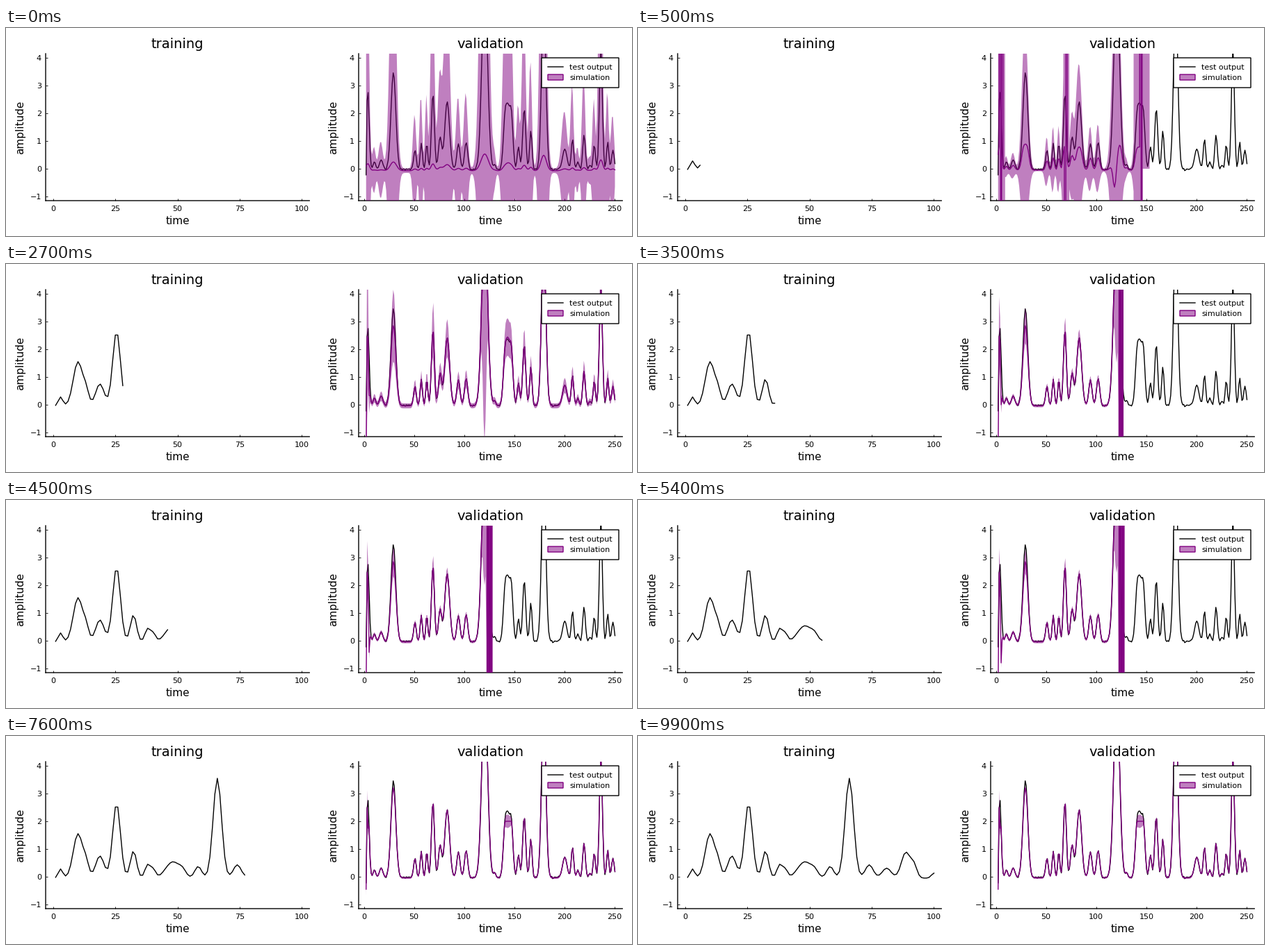
Recreate the animation shown at these times as a matplotlib script. Size 900 by 300 pixels, loop 10000 ms.

```python
import numpy as np
import matplotlib.pyplot as plt
from matplotlib.animation import FuncAnimation
from matplotlib.patches import Rectangle

W, H, DPI = 900, 300, 100
FRAMES, INTERVAL = 100, 100
TOP, BOTTOM, WIDTH = 37, 249, 379.2
PURPLE = "#800080"
HUGE = 60

plt.rcParams["font.family"] = "DejaVu Sans"
plt.rcParams["path.snap"] = False

# pulses: centre, height, spread
TRAIN = [
    (3, .33, .9), (10, 1.6, 1.9), (13.3, .45, 1.1), (18.8, .8, 1.7),
    (25.5, 2.7, 1.55), (32.3, .98, 1.25), (38, .48, 1.1), (40.3, .3, 1),
    (45, .15, 1.8), (48.3, .55, 2.2), (52, .28, 1.5), (58.3, .42, 1.4),
    (66, 3.6, 1.7), (74, .48, 1.6), (81, .36, 1.8), (88.7, .93, 1.8),
    (92, .42, 1.2), (100, .18, 1)]
TEST = [
    (3.7, 2.85, 1.35), (10.3, .28, 1.3), (17, .35, 1.7), (29.2, 3.5, 2.4),
    (50.7, .7, 1.3), (57, .95, 1.1), (62.5, .95, 1), (68.6, 2.75, 1.45),
    (75.7, 1.15, 1.6), (82.8, 2.45, 2.4), (94, .93, 1.6), (101.7, .98, 1.6),
    (120.2, 6.7, 2.85), (130.2, .17, 1.1), (140.9, 2.15, 1.9),
    (143.6, 1.05, 1.3), (146.5, 2.15, 1.75), (153.8, .82, 1.2),
    (159.6, 2.2, 1.5), (166.2, 1.4, 1.2), (179, 6.2, 2.1), (200, .74, 2.2),
    (207.7, 1.1, 1.2), (213, .28, 1.1), (219.2, 1.25, 1.3), (225, .15, 1.2),
    (229.4, .9, 1.1), (236, 4.4, 1.45), (242.8, 1, 1.1), (248, .7, 1.3)]


def pulses(t, parts, spread=1, shift=0):
    return sum(a * np.exp(-((t - c - shift) / (s * spread)) ** 2 / 2)
               for c, a, s in parts)


def bump(c, a, s):
    return pulses(x, [(c, a, s)])


def within(a, b):
    return (x >= a) & (x <= b)


def flip(t):
    return HUGE * np.where(t % 2 == 0, 1, -1)


train_x = np.arange(1, 101)
train_y = pulses(train_x, TRAIN) - .05
x = np.arange(2.0, 251)
rng = np.random.default_rng(3)
level = pulses(x, TEST)
output = level - .03 + rng.uniform(-.04, .04, x.size) * (level < .15)
output[0] = -.22

prior_mean = .09 * pulses(x, TEST, 1.3) - .07
prior_half = .08 + 2.7 * pulses(x, TEST, 1.2, -.5)
fit = pulses(x, TEST, 1.03) - .04 + bump(29, -.25, 2.5)


def unlearned(k):
    return prior_mean, prior_half * (1 - .1 * k), x.size


def unstable():
    """A weak fit that diverges in three places and stops at the last."""
    mean = np.tanh(.5 * level) - .05 + bump(118, -1.6, 2)
    half = .45 * prior_half
    for a, b in ((3, 8), (68, 72), (138, 153)):
        half[within(a, b)] = HUGE
    for a, b in ((4, 6), (69, 70), (144, 146)):
        hit = within(a, b)
        mean[hit] = flip(x[hit])
    mean[x > 146] = HUGE
    return mean, half, 152


def explode(mean, half, a, b):
    """Alternating divergence from a to b, nothing after it."""
    hit = within(a, b)
    mean[hit] = flip(x[hit])
    half[hit] = HUGE
    return mean, half, int(b - 1)


def partial(k):
    """Good up to the highest pulse; p runs as the start gets rougher."""
    p = np.clip((k - 35) / 19, -.5, 1.2)
    mean = np.minimum(fit, 4.2) + bump(29, -.35, 2.5)
    mean += bump(5, -1.8 - .8 * p, .6)
    mean[0] = -1.8
    half = (.05 + (.11 - .06 * p) * np.minimum(level, 4)
            + bump(29, .2, 2.5) + bump(120, 2.2 - .7 * p, 1.6)
            + bump(3, 1.1 - .4 * p, .8) + bump(70, .3, 1))
    if k < 28:
        return mean, half * 1.8, x.size
    return explode(mean, half, 122, 127 if k < 45 else 128)


def learned(k):
    mean = np.where(within(138, 149), np.minimum(fit, 2), fit)
    mean[:3] = -.45, 2.5, 1.75
    half = .035 + .015 * level + bump(143, .17, 3) + bump(3, .55, .7)
    return mean, half * (1.6 if k < 66 else 1), x.size


def simulate(k):
    """Mean, half width and number of valid samples."""
    if k < 5:
        return unlearned(k)
    if k < 7:
        return unstable()
    if k < 24:
        return explode(output.copy(), np.full(x.size, .2), 2, 6)
    return partial(k) if k < 64 else learned(k)


fig = plt.figure(figsize=(W / DPI, H / DPI), dpi=DPI, facecolor="white")
over = fig.add_axes([0, 0, 1, 1], zorder=5)
over.set(xlim=(0, W), ylim=(H, 0))
over.axis("off")


def text(px, py, label, size, **kw):
    over.text(px, py, label, **{"fontsize": size, "va": "baseline", **kw})


def box(x0, y0, x1, y1, **kw):
    over.add_patch(Rectangle((x0, y0), x1 - x0, y1 - y0, lw=1, **kw))


def panel(left, xlim, ticks, title):
    ax = fig.add_axes([left / W, 1 - BOTTOM / H, WIDTH / W, (BOTTOM - TOP) / H])
    ax.set(xlim=xlim, ylim=(-1.15, 4.15), xticks=ticks, yticks=range(-1, 5))
    ax.patch.set_visible(False)
    ax.spines[["top", "right"]].set_visible(False)
    ax.spines[["left", "bottom"]].set_linewidth(1)
    ax.tick_params(direction="in", length=2, width=.6,
                   labelbottom=False, labelleft=False)
    mid = left + WIDTH / 2
    scale = WIDTH / (xlim[1] - xlim[0])
    text(mid, 29, title, 14, ha="center")
    text(mid, 283, "time", 11, ha="center")
    text(left - 36, 143.5, "amplitude", 11, ha="center", va="center", rotation=90)
    for t in ticks:
        text(left + (t - xlim[0]) * scale - .3, 263.6, str(t), 8, ha="center")
    for t in range(-1, 5):
        text(left - 6, 207 - 40 * t, str(t).replace("-", "\u2212"), 8, ha="right")
    return ax


left = panel(57, (-3, 103), range(0, 101, 25), "training")
right = panel(507, (-5.44, 257.44), range(0, 251, 50), "validation")

box(770, 43, 881, 86, fc="white", ec="black")
over.plot([779, 801], [56, 56], color="black", lw=1)
box(779, 67, 801, 75, fc=(.5, 0, .5, .5), ec=PURPLE)
text(810, 60, "test output", 8)
text(810, 75, "simulation", 8)

train_line, = left.plot([], [], color="black", lw=1)
right.plot(x, output, color="black", lw=1)
band, = right.fill([0, 0, 0], [0, 0, 0], fc=PURPLE, alpha=.5, lw=0, zorder=3)
mean_line, = right.plot([], [], color=PURPLE, lw=1, zorder=4)


def update(k):
    train_line.set_data(train_x[:k + 1], train_y[:k + 1])
    mean, half, n = simulate(k)
    t, m, h = x[:n], mean[:n], half[:n]
    mean_line.set_data(t, m)
    band.set_xy(np.column_stack([np.r_[t, t[::-1]],
                                 np.r_[m + h, (m - h)[::-1]]]))
    return train_line, band, mean_line


anim = FuncAnimation(fig, update, frames=FRAMES, interval=INTERVAL,
                     repeat=True, repeat_delay=0, cache_frame_data=False)
plt.show()
```
